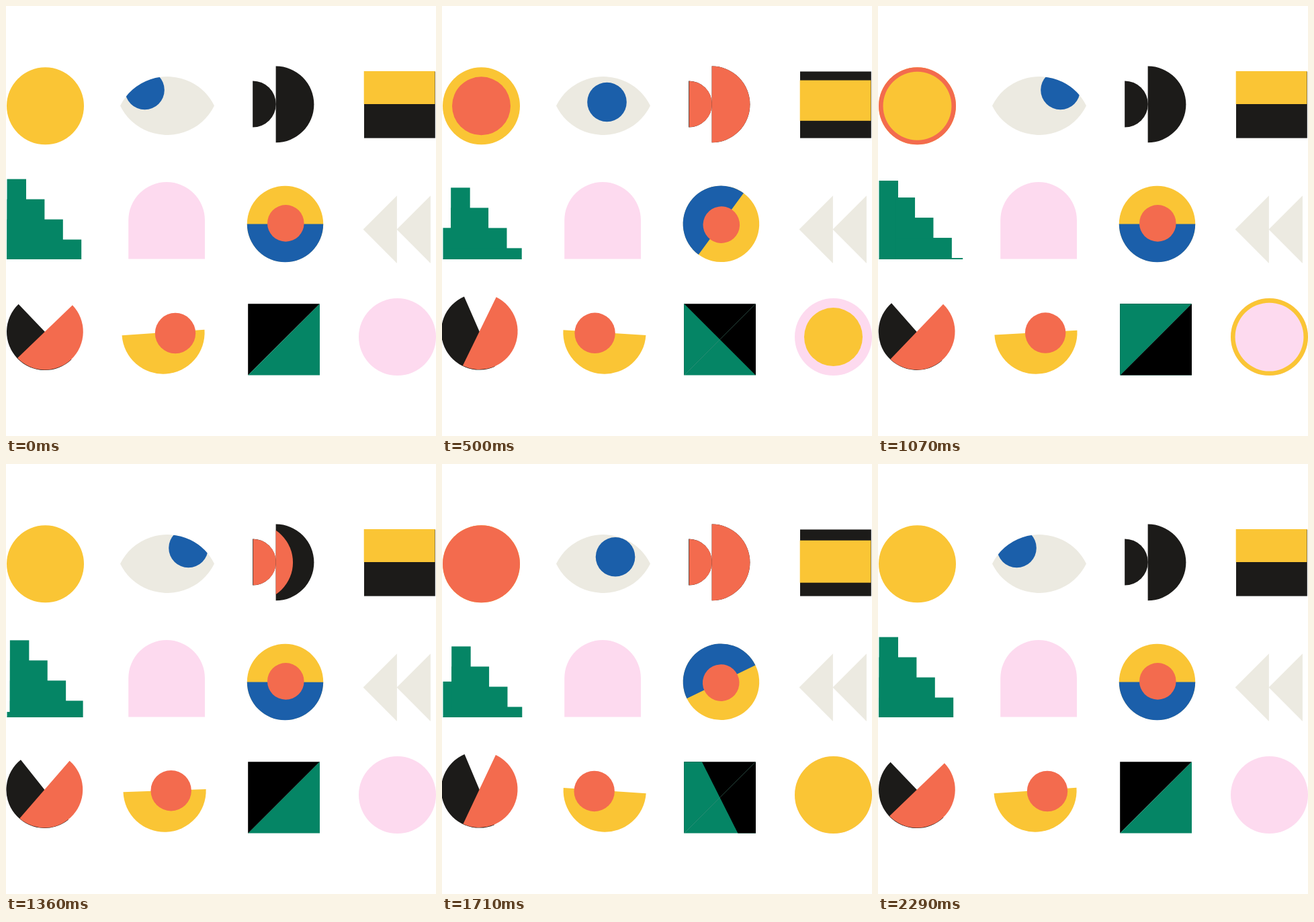
An HTML page with a canvas for the animation above (2.37 s loop, 640 by 640 pixels).

```html
<!DOCTYPE html>
<html lang="en">
<head>
<meta charset="utf-8">
<title>Shapes</title>
<style>
html, body { margin: 0; width: 100%; height: 100%; overflow: hidden; background: #fff; }
canvas { display: block; }
</style>
</head>
<body>
<canvas id="stage" width="640" height="640"></canvas>
<script>
const ctx = document.getElementById('stage').getContext('2d');
const YELLOW = '#fac535', ORANGE = '#f36b4e', BLUE = '#1b5faa', CREAM = '#eceae1';
const INK = '#1c1b19', BLACK = '#000', GREEN = '#058565', PINK = '#fddaef';
const LOOP = 2370, STEP = 1000 / 14, LAST = 32, CYCLE = 16.4;
const RAD = Math.PI / 180;

const clamp = x => Math.min(1, Math.max(0, x));
const mix = (a, b, p) => a + (b - a) * p;
function ease(t, from, to) {
  const x = clamp((t - from) / (to - from));
  return x * x * (3 - 2 * x);
}

function rect(x0, y0, x1, y1, color) {
  ctx.fillStyle = color;
  ctx.fillRect(x0, y0, x1 - x0, y1 - y0);
}
function disc(x, y, r, color) {
  if (r <= 0) return;
  ctx.fillStyle = color;
  ctx.beginPath();
  ctx.arc(x, y, r, 0, 7);
  ctx.fill();
}
function halfPath(x, y, r, deg) {
  ctx.beginPath();
  ctx.arc(x, y, r, deg * RAD, (deg + 180) * RAD);
  ctx.closePath();
}
function half(x, y, r, deg, color) {
  ctx.fillStyle = color;
  halfPath(x, y, r, deg);
  ctx.fill();
}
function polyPath(...pts) {
  ctx.beginPath();
  for (let i = 0; i < pts.length; i += 2) ctx.lineTo(pts[i], pts[i + 1]);
  ctx.closePath();
}
function scoped(draw) {
  ctx.save();
  draw();
  ctx.restore();
}

// Disc whose two colours keep growing over each other
function pulse(x, y, ph, base, over) {
  const r = 57.5;
  disc(x, y, r, base);
  disc(x, y, r * clamp((ph - 3) / 4.6) ** 2, over);
  disc(x, y, r * ease(ph, 8.25, 16.8), base);
}

function eye(n) {
  const cx = 240, cy = 148.5, r = 78.07, drop = r - 43.5;
  const a = Math.atan2(drop, 70);
  const p = ease(n, 2.35, 10.55) - ease(n, 21.6, 29.8);
  const u = 2 * p - 1;
  scoped(() => {
    ctx.beginPath();
    ctx.arc(cx, cy + drop, r, Math.PI + a, -a);
    ctx.arc(cx, cy - drop, r, a, Math.PI - a);
    ctx.closePath();
    ctx.fillStyle = CREAM;
    ctx.fill();
    ctx.clip();
    disc(239 + 32.5 * u, 125 + 18.4 * (1 - Math.abs(u) ** 2.4), 29.3, BLUE);
  });
}

function wave(x, y, r, p, inset) {
  half(x, y, r, -90, INK);
  if (p <= 0) return;
  scoped(() => {
    halfPath(x + inset, y, r - inset / 2, -90);
    ctx.clip();
    disc(x - r * (1 - p), y, r + 0.5, ORANGE);
  });
}
function waves(ph) {
  wave(367.2, 146, 34.6, ease(ph, 0, 2.4) - ease(ph, 12.3, 14.8), 0.6);
  wave(401.6, 146.4, 56.8, ease(ph, 0.9, 4.6) - ease(ph, 11.6, 14.2), 0);
}

function band(ph) {
  const p = ease(ph, 4.5, 8.2) - ease(ph, 10.4, 14.1);
  rect(533, 97.5, 638.8, 196.6, INK);
  rect(532.7, mix(97, 115, p), 638.4, mix(146, 179, p), YELLOW);
}

function stairs(ph) {
  const q = ph / CYCLE, dx = 27.4 * q, dy = 30 * q, floor = 377;
  rect(1.5, floor - 119.5 * ease(q, 0, 1), 30, floor, GREEN);
  for (let k = 0; k < 4; k++) {
    const right = k < 3 ? 30 + 27.4 * k + dx : 112.2 + 15.3 * q;
    rect(1.5 + dx, 257.6 + 30 * k + dy, right, floor, GREEN);
  }
  rect(1.5, floor - 0.5, 30, floor, GREEN);
}

function arch() {
  ctx.fillStyle = PINK;
  ctx.beginPath();
  ctx.arc(239.1, 319, 56.9, Math.PI, 0);
  ctx.lineTo(296, 376.4);
  ctx.lineTo(182.2, 376.4);
  ctx.fill();
}

function wheel(ph) {
  scoped(() => {
    ctx.translate(415.5, 324.4);
    ctx.rotate(360 * ease(ph, 2.45, 13.85) * RAD);
    disc(0, 0, 56.7, YELLOW);
    half(0, 0.2, 56.7, 0, BLUE);
    disc(0.8, -1, 27.3, ORANGE);
  });
}

function arrows() {
  ctx.fillStyle = CREAM;
  for (const x of [531.6, 581.6]) {
    polyPath(x, 332.6, x + 50.3, 282.3, x + 50.3, 383);
    ctx.fill();
  }
}

function mouth(p) {
  const x = 58 - 2.3 * p, y = 485 - 0.4 * p;
  half(x, y, 57, 46.3 + 21 * p, INK);
  half(x, y - 0.3, 56.8, -43.9 - 21 * p, ORANGE);
}

function bowl(p) {
  half(234 + 8.3 * p, 486.1, 61.6, -3.95 + 7.8 * p, YELLOW);
  disc(252 - 25.5 * p, 485.9 + 1.1 * (2 * p - 1) ** 2, 30.2, ORANGE);
}

function square(ph) {
  const l = 360.2, t = 443.2, r = 467, b = 549.6;
  const turn = (-135 + 180 * ease(ph, 2.6, 11.4)) * RAD;
  const side = (x, y, base, over, from) => scoped(() => {
    polyPath(l, b, x, y, r, t);
    ctx.fillStyle = base;
    ctx.fill();
    if (ph <= 2.6) return;
    ctx.clip();
    ctx.translate((l + r) / 2, (t + b) / 2);
    ctx.rotate(turn);
    rect(from, -99, from + 99, 99, over);
  });
  side(l, t, BLACK, GREEN, -99);
  side(r, b, GREEN, BLACK, 0);
}

function draw(ms) {
  const n = Math.min(LAST, Math.floor((ms + 5) / STEP));
  const ph = n === LAST ? 0 : n % CYCLE;
  const rock = ease(ph, 0, 8) - ease(ph, 8.9, 16.6);
  rect(0, 0, 640, 640, '#fff');
  pulse(58.5, 148.8, ph, YELLOW, ORANGE);
  eye(n);
  waves(ph);
  band(ph);
  stairs(ph);
  arch();
  wheel(ph);
  arrows();
  mouth(rock);
  bowl(rock);
  square(ph);
  pulse(582.5, 492.6, ph, PINK, YELLOW);
}

const start = performance.now();
function tick() {
  draw((performance.now() - start) % LOOP);
  requestAnimationFrame(tick);
}
tick();
</script>
</body>
</html>
```
